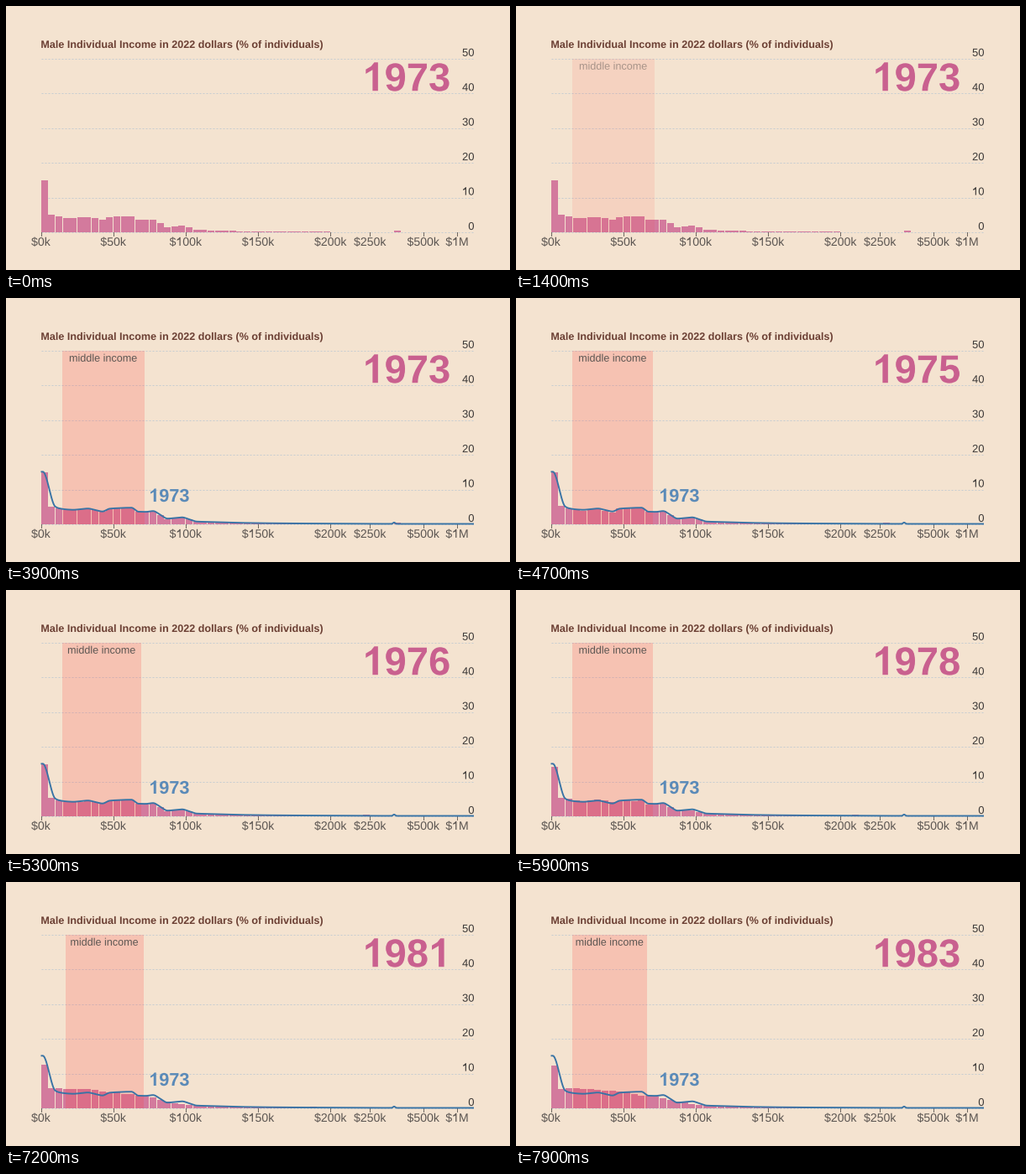
Animation, 600 px wide and 315 px high, one loop 8 s. Source, as a matplotlib script:

```python
import numpy as np
import matplotlib.pyplot as plt
from matplotlib.animation import FuncAnimation
from matplotlib.patches import PathPatch, Rectangle
from matplotlib.path import Path
from matplotlib.textpath import TextPath
from matplotlib.transforms import Affine2D

W, H, DPI = 600, 315, 100
STEP_MS, FRAMES = 100, 80
PX = 72 / DPI

BG, BAR, YEAR = "#f4e3d0", "#d37a9d", "#c9608f"
BAND, LINE, LINE_LABEL = (1, .25, .23), "#3873a5", "#5a8ab8"
GRID, TICK, TITLE, GRAY, DARK = "#c6cdd1", "#6f6862", "#6c4034", "#5c5652", "#3a3736"

LEFT, RIGHT, BASE, TOP = 41.5, 557, 270, 62.8
BIN, BINS = 8.62, 45
FIRST_YEAR, YEARS = 1973, 11
YEARS_START, YEAR_MS = 4300, 400

# (bin, height in px) outlines of the first and the last year
FIRST_SHAPE = [(0, 62.4), (1, 21), (4, 17), (6, 18.5), (8, 15), (9, 18.3), (12, 19.5), (13.3, 14),
               (15, 15.5), (17, 6.5), (19, 8), (21, 3), (32, .9), (44, .4)]
LAST_SHAPE = [(0, 51), (1, 24.5), (5, 23.5), (10, 18), (14, 14), (17, 8), (21, 3.5), (44, .3)]
# (year offset, left, right) of the middle income band
BAND_EDGES = [(0, 66.5, 165), (3, 66.5, 160.8), (6, 68, 166), (8, 70.6, 164), (10, 67.3, 155.5)]

DIGIT = .556


def footless_one(bold):
    """A plain "1" in em units."""
    left, right = (.256, .393) if bold else (.285, .373)
    return np.array([(right, 0), (left, 0), (left, .53), (.085, .43), (.085, .54),
                     (.22, .62), (.3, .719), (right, .719), (right, 0)])


def glyphs(text, x, y, size, bold=False, anchor="origin"):
    """Outline of a text with its baseline at y."""
    font = dict(family="Liberation Sans", weight="bold" if bold else "normal")
    # Two spaces are as wide as one digit.
    parts = [TextPath((0, 0), text.replace("1", "  "), size=size, prop=font)]
    for i, char in enumerate(text):
        if char == "1":
            parts.append(Path((footless_one(bold) + (i * DIGIT, 0)) * size, closed=True))
    path = Path.make_compound_path(*parts)
    box = path.get_extents()
    shift = {"origin": 0, "left": box.x0, "right": box.x1, "center": (box.x0 + box.x1) / 2}[anchor]
    return path.transformed(Affine2D().scale(1, -1).translate(x - shift, y))


def add_text(color, *args, **kwargs):
    return ax.add_patch(PathPatch(glyphs(*args, **kwargs), fc=color, lw=0, zorder=6))


def add_bar(x):
    return ax.add_patch(Rectangle((x, BASE), BIN - .6, 0, fc=BAR, lw=0, zorder=2))


def set_height(bar, height):
    bar.set_y(BASE - height)
    bar.set_height(height)


def ease(u):
    u = np.clip(u, 0, 1)
    return 4 * u**3 if u < .5 else 1 - 4 * (1 - u)**3


def monotone(x, y, xs):
    """Smooth curve through the points without overshoot."""
    h = np.diff(x)
    d = np.diff(y) / h
    m = np.zeros(len(x))
    same = d[:-1] * d[1:] > 0
    m[1:-1][same] = 2 * d[:-1][same] * d[1:][same] / (d[:-1] + d[1:])[same]
    i = np.clip(np.searchsorted(x, xs, side="right") - 1, 0, len(h) - 1)
    u = (xs - x[i]) / h[i]
    return (y[i] * (1 + 2 * u) * (1 - u)**2 + y[i + 1] * u**2 * (3 - 2 * u)
            + h[i] * u * (1 - u) * (m[i] * (1 - u) - m[i + 1] * u))


def yearly_heights():
    """The first outline drifts to the last one, with some scatter each year."""
    rng = np.random.default_rng(5)
    bins = np.arange(BINS)
    first, last = (monotone(*np.array(shape, float).T, bins) for shape in (FIRST_SHAPE, LAST_SHAPE))
    rows = [first]
    for k in range(1, YEARS):
        scatter = 1 + .05 * rng.uniform(-1, 1, BINS)
        scatter[0] = 1
        rows.append((first + (last - first) * ease(k / (YEARS - 1))) * scatter)
    return np.array(rows)


fig = plt.figure(figsize=(W / DPI, H / DPI), dpi=DPI, facecolor=BG)
ax = fig.add_axes([0, 0, 1, 1])
ax.set_xlim(0, W)
ax.set_ylim(H, 0)
ax.axis("off")

# Axes and static texts
for value in range(0, 51, 10):
    y = BASE - value / 50 * (BASE - TOP)
    ax.plot([LEFT, RIGHT], [y, y], color=GRID, lw=PX, ls=(0, (2, 2)), zorder=1)
    add_text(DARK, str(value), RIGHT, y - 3, 13, anchor="right")

ticks = [(f"${50 * i}k", LEFT + 86.2 * i) for i in range(5)]
ticks += [("$250k", 433.3), ("$500k", 496.8), ("$1M", 536.5)]
for name, x in ticks:
    ax.plot([x, x], [BASE, BASE + 3.5], color=TICK, lw=PX, zorder=1)
    add_text(GRAY, name, x, 286, 14.1, anchor="center")

add_text(TITLE, "Male Individual Income in 2022 dollars (% of individuals)",
         42.2, 50, 12.58, bold=True, anchor="left")

# Moving parts
heights = yearly_heights()
bars = [add_bar(LEFT + .2 + i * BIN) for i in range(BINS)]
top_bar = add_bar(462)
band = ax.add_patch(Rectangle((0, TOP), 0, BASE - TOP, fc=BAND, lw=0, zorder=3))
band_text = add_text(GRAY, "middle income", 0, 75.8, 12.6, anchor="center")
year_text = add_text(YEAR, str(FIRST_YEAR), 424.3, 101.2, 47.2, bold=True)
curve, = ax.plot([], [], color=LINE, lw=1.9 * PX, zorder=5, solid_capstyle="butt")
curve_text = add_text(LINE_LABEL, str(FIRST_YEAR), 170.2, 243, 21.7, bold=True)

# The line follows the bars of the first year, with a bump at the top bar.
first = heights[0]
centers = LEFT + BIN * (np.arange(BINS) + .5)
knots_x = np.concatenate([[LEFT, 43.8, 58.5], centers[2:], [459, 462, 465, RIGHT]])
knots_y = np.concatenate([[first[0], first[0], first[1]], first[2:], [.2, 1.8, .2, .2]])
line_x = np.linspace(LEFT, RIGHT, 1600)
line_y = BASE - .3 - monotone(knots_x, knots_y, line_x)
length = np.concatenate([[0], np.cumsum(np.hypot(np.diff(line_x), np.diff(line_y)))])


def update(frame):
    t = frame * STEP_MS
    passed = max(0, (t - YEARS_START) / YEAR_MS)
    year = FIRST_YEAR + (int(passed) + 1 if t >= YEARS_START else 0)

    for bar, column in zip(bars, heights.T):
        set_height(bar, np.interp(passed, np.arange(YEARS), column))
    top_bar.set_x(462 - 12.5 * (year - FIRST_YEAR))
    set_height(top_bar, 1.8)

    offsets, lefts, rights = zip(*BAND_EDGES)
    position = min(passed * 10 / 9, 10)
    left, right = np.interp(position, offsets, lefts), np.interp(position, offsets, rights)
    shown = ease((t - 900) / 1000)
    band.set_x(left)
    band.set_width(right - left)
    band.set_alpha(.2 * shown)
    band_text.set_path(glyphs("middle income", (left + right) / 2, 75.8, 12.6, anchor="center"))
    band_text.set_alpha(shown)

    drawn = ease((t - 1890) / 2000) * length[-1]
    visible = (length <= drawn) & (drawn > 0)
    curve.set_data(line_x[visible], line_y[visible])
    curve_text.set_alpha(np.clip((t - 3700) / 200, 0, 1))

    year_text.set_path(glyphs(str(year), 424.3, 101.2, 47.2, bold=True))
    return []


animation = FuncAnimation(fig, update, frames=FRAMES, interval=STEP_MS,
                          init_func=lambda: update(0), repeat=True, repeat_delay=0)
plt.show()
```
